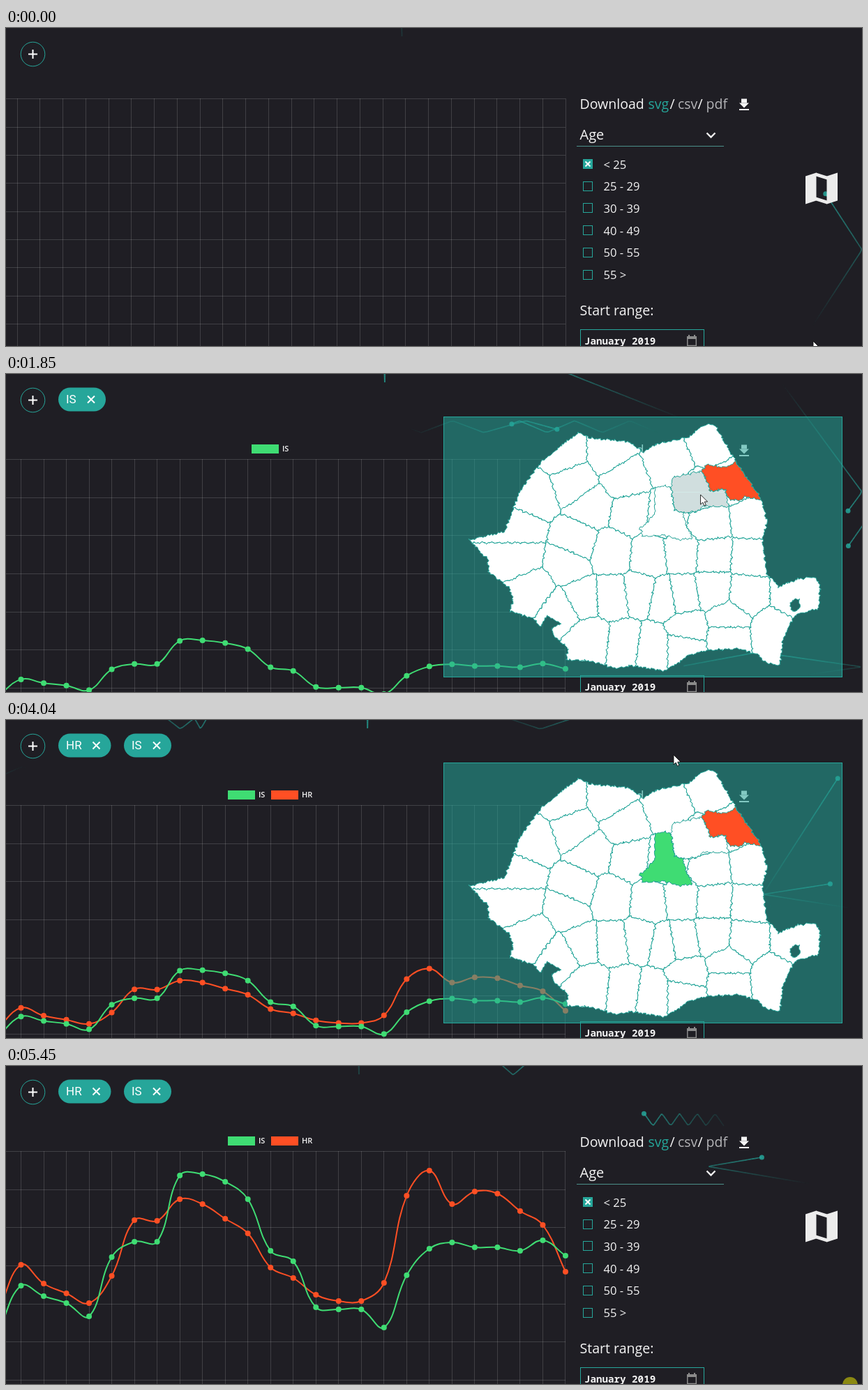
Animation of 1227x456 px, one loop 5.53 s. Source, as an HTML page with a canvas:

```html
<!DOCTYPE html>
<html lang="en">
<head>
<meta charset="utf-8">
<title>Regional chart with map picker</title>
<style>
html, body { margin: 0; width: 100%; height: 100%; overflow: hidden; background: #1f1e24; }
canvas { display: block; }
</style>
</head>
<body>
<canvas id="stage" width="1227" height="456"></canvas>
<script>
const W = 1227, H = 456, LOOP = 5530;
const TEAL = '#26a69a', GREEN = '#3fdc73', RED = '#ff4f24', BG = '#1f1e24';
const SANS = '"Open Sans", "Noto Sans", sans-serif';
const view = document.getElementById('stage').getContext('2d');
const layer = document.createElement('canvas');
layer.width = W;
layer.height = H;
const over = layer.getContext('2d');

const clamp = v => Math.max(0, Math.min(1, v));
const ramp = (t, a, b) => clamp((t - a) / (b - a));
const mix = (a, b, k) => a + (b - a) * k;
const lerp = (p, q, k) => [mix(p[0], q[0], k), mix(p[1], q[1], k)];
const dist = (p, q) => Math.hypot(q[0] - p[0], q[1] - p[1]);
const smooth = k => k * k * (3 - 2 * k);
const points = s => s.split(' ').map(p => p.split(',').map(Number));

function line(c, pts, color, width = 1) {
  c.strokeStyle = color;
  c.lineWidth = width;
  c.beginPath();
  pts.forEach(p => c.lineTo(p[0], p[1]));
  c.stroke();
}

function cross(c, x, y, d) {
  line(c, [[x - d, y - d], [x + d, y + d]], '#fff', 2);
  line(c, [[x - d, y + d], [x + d, y - d]], '#fff', 2);
}

function dot(c, x, y, r, color) {
  c.fillStyle = color;
  c.beginPath();
  c.arc(x, y, r, 0, Math.PI * 2);
  c.fill();
}

function text(c, s, x, y, font, color = '#f4f4f4') {
  c.font = font;
  c.fillStyle = color;
  c.fillText(s, x, y);
}

// ---------- background trails ----------
const TAIL = 230;

// a path whose head passes point number `head` at `time`
function trail(time, pts, head, speed = .43) {
  const len = [0];
  for (let i = 1; i < pts.length; i++) len[i] = len[i - 1] + dist(pts[i - 1], pts[i]);
  return { time, pts, len, start: len[head], speed, end: len[pts.length - 1] };
}

const zig = (x, step, n, y1 = 84, y2 = 67) =>
  Array.from({ length: n }, (_, i) => [x + i * step, i % 2 ? y2 : y1]);

// comes in mirrored, bends at (bx, by), reaches (x, y), then meets the right edge
function bounce(time, x, y, bx, by, wall = 'x') {
  const d = Math.hypot(x - bx, y - by), ux = (x - bx) / d, uy = (y - by) / d;
  const side = wall === 'x' ? 1 : -1;
  const pts = [[bx + 260 * ux * side, by - 260 * uy * side], [bx, by], [x, y]];
  const reach = ux > 0 ? Math.min(260, (W - x) / ux) : 260;
  const edge = [x + reach * ux, y + reach * uy];
  pts.push(edge);
  if (reach < 260) pts.push([edge[0] - 260 * ux, edge[1] + 260 * uy]);
  return trail(time, pts, 2);
}

const vee = (time, x, slope) => bounce(time, x + 3 * slope, -29, x, 13, 'y');

const trails = [
  trail(2400, zig(934, -39.6, 27), 11, .449),
  trail(1310, [...zig(325, 45, 9), ...zig(745, 62, 8, 67, 84)], 5, .468),
  trail(5450, zig(1029, -12.7, 16, 86, 68), 9, .4),
  bounce(0, 1175, 238, 1227, 318),
  bounce(1310, 1109, 9, 1095, -10),
  bounce(1310, 977, 67, 1030, 88, 'y'),
  bounce(1310, 1143, 432, 1080, 441),
  bounce(2400, 1125, 352, 1227, 371),
  bounce(2400, 1086, 440, 1079, 430),
  bounce(3200, 1178, 421, 1200, 456, 'y'),
  bounce(3200, 1095, 298, 1227, 322),
  bounce(3200, 1145, 0, 1227, 28),
  bounce(4040, 1192, 84, 1085, 250),
  bounce(4040, 1181, 235, 1085, 250),
  bounce(5450, 1083, 131, 1006, 144),
  vee(1310, 125, 18), vee(2450, 435, 13), vee(3200, 100, 8), vee(3200, 324, 16),
  vee(4040, 250, 18), vee(4040, 279, 8), vee(4040, 766, 42), vee(4600, 452, 14), vee(5450, 727, 16)
];

function along(tr, s) {
  let i = 1;
  while (i < tr.pts.length - 1 && tr.len[i] < s) i++;
  return lerp(tr.pts[i - 1], tr.pts[i], (s - tr.len[i - 1]) / (tr.len[i] - tr.len[i - 1]));
}

function drawTrail(c, tr, t) {
  const head = tr.start + (t - tr.time) * tr.speed;
  const from = Math.max(0, head - TAIL), to = Math.min(head, tr.end);
  if (to <= from) return;
  const step = 5;
  for (let s = from; s < to; s += step) {
    c.globalAlpha = .75 * (1 - (head - s) / TAIL);
    line(c, [along(tr, s), along(tr, Math.min(to, s + step))], TEAL, 1.7);
  }
  c.globalAlpha = .85;
  if (head < tr.end) dot(c, ...along(tr, head), 3.5, TEAL);
  c.globalAlpha = 1;
}

// a nearly vertical bouncer above the toolbar
function drawBouncer(c, t) {
  const at = u => {
    const phase = (((u - 4457) % 550) + 550) % 550;
    return [562 - .0112 * u, 13 - .3 * (275 - Math.abs(phase - 275))];
  };
  for (let d = 0; d < 560; d += 10) {
    c.globalAlpha = .8 * (1 - d / 560);
    line(c, [at(t - d), at(t - d - 10)], TEAL, 1.7);
  }
  c.globalAlpha = .85;
  dot(c, ...at(t), 3.5, TEAL);
  c.globalAlpha = 1;
}

// ---------- chart ----------
const FIRST = 1800, SECOND = 3978, BASE = 504;
const series = {
  IS: { color: GREEN, y: [315, 330, 340, 359, 274, 252, 252, 157, 155, 166, 191, 265, 280,
    346, 349, 349, 375, 300, 262, 253, 260, 260, 265, 250, 272] },
  HR: { color: RED, y: [285, 312, 326, 340, 301, 221, 222, 191, 198, 219, 240, 289, 304,
    328, 337, 337, 311, 186, 150, 198, 180, 183, 208, 228, 295] }
};

function drawGrid(c, x0, dx, y0, dy) {
  const color = 'rgba(255,255,255,.15)';
  for (let i = 0; i < 25; i++) {
    const x = Math.floor(x0 + i * dx) + .5;
    line(c, [[x, Math.floor(y0)], [x, H]], color);
  }
  for (let y = y0; y < H; y += dy) {
    const r = Math.floor(y) + .5;
    line(c, [[0, r], [802, r]], color);
  }
}

function drawSeries(c, { y, color }, k) {
  const pts = [y[0] + 68, ...y].map((v, i) => [21.5 + 32.52 * (i - 1), BASE - (BASE - v) * k]);
  const ctrl = pts.map((p, i) => {
    const a = pts[i - 1] || p, b = pts[i + 1] || p;
    const d0 = dist(a, p), d1 = dist(p, b);
    const f0 = .4 * d0 / (d0 + d1), f1 = .4 * d1 / (d0 + d1);
    const vx = b[0] - a[0], vy = b[1] - a[1];
    return [p[0] - f0 * vx, p[1] - f0 * vy, p[0] + f1 * vx, p[1] + f1 * vy];
  });
  c.strokeStyle = color;
  c.lineWidth = 2;
  c.beginPath();
  c.moveTo(...pts[0]);
  for (let i = 1; i < pts.length; i++) {
    c.bezierCurveTo(ctrl[i - 1][2], ctrl[i - 1][3], ctrl[i][0], ctrl[i][1], ...pts[i]);
  }
  c.stroke();
  pts.forEach(p => dot(c, p[0], p[1], 4, color));
}

function legend(c, name, x) {
  c.fillStyle = series[name].color;
  c.fillRect(x, 101, 39, 13);
  text(c, name, x + 44, 111, '600 11px ' + SANS);
}

function drawChart(c, t) {
  if (t < FIRST) return drawGrid(c, 16, 32.75, 101.7, 40.34);
  drawGrid(c, 21.5, 32.52, 122.6, 54.6);
  const both = t >= SECOND, start = both ? SECOND : FIRST;
  const k = 1 - (1 - ramp(t, start, start + 500)) ** 4;
  if (both) drawSeries(c, series.HR, k);
  drawSeries(c, series.IS, k);
  legend(c, 'IS', both ? 318 : 352);
  if (both) legend(c, 'HR', 380);
}

// ---------- toolbar and side panel ----------
function chip(c, name, x) {
  const w = name === 'IS' ? 68 : 75.5;
  c.fillStyle = TEAL;
  c.beginPath();
  c.roundRect(x, 19.5, w, 34, 17);
  c.fill();
  text(c, name, x + 11, 42, '17px Roboto, sans-serif', '#fff');
  cross(c, x + w - 21, 36.5, 5);
}

function drawToolbar(c, t) {
  c.strokeStyle = TEAL;
  c.lineWidth = 1;
  c.beginPath();
  c.arc(38.5, 37.5, 17.3, 0, Math.PI * 2);
  c.stroke();
  line(c, [[32, 37.5], [45, 37.5]], '#fff', 2);
  line(c, [[38.5, 31], [38.5, 44]], '#fff', 2);
  const first = t >= 3430 ? 'HR' : t >= 2330 && t < 2900 ? 'NT' : '';
  if (first) chip(c, first, 75);
  if (t >= 1380) chip(c, 'IS', first ? 169 : 75);
}

function drawMapIcon(c, alpha) {
  c.globalAlpha = alpha;
  c.fillStyle = '#ececec';
  const fold = (x, y, w, h, skew) => {
    c.beginPath();
    c.moveTo(x, y);
    c.lineTo(x + w, y + skew);
    c.lineTo(x + w, y + skew + h);
    c.lineTo(x, y + h);
    c.fill();
  };
  fold(1146, 212.5, 15.5, 40, -5);
  fold(1176.5, 212.5, 15.5, 40, -5);
  fold(1161, 207.5, 16, 5, 5);
  fold(1161, 242.5, 16, 5, 5);
  c.globalAlpha = 1;
}

function drawPanel(c, open) {
  const big = '19.5px ' + SANS, dim = '#b4b4b7';
  text(c, 'Download', 822.5, 116, big);
  text(c, 'svg', 920.5, 116, big, TEAL);
  text(c, '/', 951.5, 116, big);
  text(c, 'csv', 963, 116, big, dim);
  text(c, '/', 991.5, 116, big);
  text(c, 'pdf', 1003.5, 116, big, dim);

  c.fillStyle = '#f4f4f4';
  c.fillRect(1054, 101.5, 8, 6);
  c.beginPath();
  c.moveTo(1051, 107.5);
  c.lineTo(1065, 107.5);
  c.lineTo(1058, 114.5);
  c.fill();
  c.fillRect(1051, 116, 14, 2);

  text(c, 'Age', 822.5, 160, '20px ' + SANS);
  line(c, [[1004.5, 150.5], [1010.5, 156.5], [1016.5, 150.5]], '#f4f4f4', 2.4);
  line(c, [[818, 169.5], [1029, 169.5]], '#4b8f89');

  ['< 25', '25 - 29', '30 - 39', '40 - 49', '50 - 55', '55 >'].forEach((label, i) => {
    const y = 195 + 31.7 * i, top = Math.round(y - 6);
    c.strokeStyle = TEAL;
    c.lineWidth = 1;
    c.strokeRect(827.5, top - .5, 13, 13);
    if (!i) {
      c.fillStyle = TEAL;
      c.fillRect(827, top - 1, 14, 14);
      cross(c, 834, 195, 3.5);
    }
    text(c, label, 856.5, y + 6.5, '500 16.6px ' + SANS);
  });

  text(c, 'Start range:', 822.5, 412, '19.6px ' + SANS);
  c.strokeStyle = TEAL;
  c.lineWidth = 1;
  c.strokeRect(823.5, 432.5, 177, 40);
  text(c, 'January 2019', 829, 454, '600 14.2px "Noto Sans Mono", "DejaVu Sans Mono", monospace');
  c.strokeStyle = c.fillStyle = '#8b8b8b';
  c.lineWidth = 1.5;
  c.strokeRect(976.8, 443, 12.5, 12.5);
  c.fillRect(976, 442, 14, 4);
  c.fillRect(978, 440, 2, 3);
  c.fillRect(986, 440, 2, 3);
  drawMapIcon(c, 1 - open);
}

// ---------- county map ----------
const coast = points('664,238 715,226 725,199 735,172 756,140 768,125 800,100 820,83 838,92 893,97 915,113 930,101 976,91 992,79 1006,71 1018,75 1035,107 1046,125 1062,148 1083,181 1091,212 1084,238 1090,285 1107,305 1135,294 1158,291 1167,303 1165,336 1130,346 1114,380 1109,418 1090,414 1078,402 1050,394 1005,396 980,403 945,426 895,418 875,422 835,411 803,410 806,393 786,377 782,364 796,358 775,346 767,362 755,350 722,340 727,325 722,308 692,283 690,265');
const lagoon = points('1125,325 1137,323 1138,335 1130,341 1124,335');
const counties = {
  IS: points('998,139 1003,130 1030,134 1046,125 1062,148 1083,181 1060,176 1050,181 1036,180 1031,165 1010,168'),
  NT: points('956,148 998,139 1010,168 1031,165 1036,190 997,190 990,197 970,199 958,195 953,162'),
  HR: points('930,164 940,160 953,162 958,195 970,199 974,214 984,235 965,238 945,231 913,233 909,221 930,201')
};
// one seat per county; borders run halfway between neighbours
const seats = points('800,115 865,115 950,125 1010,100 755,175 815,155 885,150 840,190 895,200 945,205 995,170 1040,155 1010,215 1067,210 735,222 818,240 805,272 735,262 755,310 795,338 825,322 868,255 923,260 967,255 1015,258 1065,262 1015,310 1060,315 968,318 944,322 908,315 870,320 838,380 888,385 925,390 972,390 976,366 1035,350 1035,376 1100,370 1130,315');

// Sutherland-Hodgman: keep the part of the polygon nearer to `a` than to `b`
function nearer(poly, a, b) {
  const side = p => dist(p, b) ** 2 - dist(p, a) ** 2;
  return poly.flatMap((p, i) => {
    const q = poly[(i + 1) % poly.length], sp = side(p), sq = side(q);
    const kept = sp >= 0 ? [p] : [];
    if (sp * sq < 0) kept.push(lerp(p, q, sp / (sp - sq)));
    return kept;
  });
}

const cell = seat => seats.reduce(
  (poly, other) => other === seat ? poly : nearer(poly, seat, other),
  [[600, 0], [W, 0], [W, H], [600, H]]
);

// jitter depends on position only, so shared edges coincide
const wobble = ([x, y]) => [
  x + 1.1 * Math.sin(x * .83 + y * 1.27) + .8 * Math.sin(y * .61 - x * .37),
  y + 1.1 * Math.sin(x * 1.19 - y * .71) + .8 * Math.sin(x * .53 + y * .47)
];

function rough(pts) {
  const path = new Path2D();
  pts.forEach((p, i) => {
    const q = pts[(i + 1) % pts.length], n = Math.ceil(dist(p, q) / 2.5);
    for (let j = 0; j < n; j++) {
      const w = wobble(lerp(p, q, j / n));
      if (i || j) path.lineTo(...w);
      else path.moveTo(...w);
    }
  });
  path.closePath();
  return path;
}

const areas = Object.fromEntries(Object.entries(counties).map(([k, pts]) => [k, rough(pts)]));
const edges = [rough(coast), rough(lagoon), ...Object.values(areas)];
const land = new Path2D(), borders = new Path2D();
edges.forEach(p => land.addPath(p));
seats.forEach(s => borders.addPath(rough(cell(s))));

const pulse = (t, a, b) => ramp(t, a, a + 100) * (1 - ramp(t, b, b + 100));
const picks = {
  IS: { rgb: [255, 79, 36], on: t => pulse(t, 1230, LOOP), hover: t => pulse(t, 1130, 1750) },
  NT: { rgb: [63, 220, 115], on: t => pulse(t, 2240, 2840), hover: t => pulse(t, 1780, 3110) },
  HR: { rgb: [63, 220, 115], on: t => pulse(t, 3340, LOOP), hover: t => pulse(t, 3110, 3700) }
};

function drawMap(c, t) {
  c.clearRect(0, 0, W, H);
  c.fillStyle = 'rgba(38,166,154,.55)';
  c.fillRect(627, 61, 572, 374);
  c.strokeStyle = TEAL;
  c.lineWidth = 1;
  c.strokeRect(627.5, 61.5, 571, 373);
  c.save();
  c.clip(land, 'evenodd');
  c.fillStyle = '#fff';
  c.fillRect(0, 0, W, H);
  c.stroke(borders);
  c.restore();
  for (const name in picks) {
    const { rgb, on, hover } = picks[name];
    c.globalAlpha = 1 - .3 * hover(t);
    c.fillStyle = `rgb(${rgb.map(v => Math.round(mix(255, v, on(t))))})`;
    c.fill(areas[name]);
    c.globalAlpha = 1;
  }
  edges.forEach(p => c.stroke(p));
}

// ---------- pointer ----------
const route = [
  [0, 1157, 449], [520, 1168, 235], [760, 1168, 235], [1310, 1009, 162], [1600, 1010, 160],
  [2000, 989, 179], [2400, 989, 177], [2950, 986, 180], [3200, 942, 207], [3560, 942, 208],
  [4040, 957, 50], [4440, 949, 32], [4750, 955, 40], [5380, 1210, 457], [LOOP, 1210, 457]
];
const arrow = points('0,0 0,14 3.2,11 5.4,16 7.8,15 5.7,10.2 10,10');

function drawPointer(c, t) {
  const i = Math.max(1, route.findIndex(p => p[0] >= t));
  const [a, b] = [route[i - 1], route[i]];
  const [x, y] = lerp(a.slice(1), b.slice(1), smooth(ramp(t, a[0], b[0])));
  if (t >= 5380) dot(c, x, y, 11, '#8b8912');
  c.save();
  c.translate(x, y);
  c.beginPath();
  arrow.forEach(p => c.lineTo(...p));
  c.closePath();
  c.fillStyle = '#fff';
  c.fill();
  c.strokeStyle = '#111';
  c.lineWidth = .9;
  c.stroke();
  c.restore();
}

function draw(t) {
  const open = ramp(t, 700, 1000) * (1 - ramp(t, 4330, 4540));
  view.fillStyle = BG;
  view.fillRect(0, 0, W, H);
  trails.forEach(tr => drawTrail(view, tr, t));
  drawBouncer(view, t);
  drawChart(view, t);
  drawToolbar(view, t);
  drawPanel(view, open);
  if (open > 0) {
    drawMap(over, t);
    view.globalAlpha = open;
    view.drawImage(layer, 0, 0);
    view.globalAlpha = 1;
  }
  drawPointer(view, t);
}

const began = performance.now();
function tick() {
  draw((performance.now() - began) % LOOP);
  requestAnimationFrame(tick);
}
tick();
</script>
</body>
</html>
```
